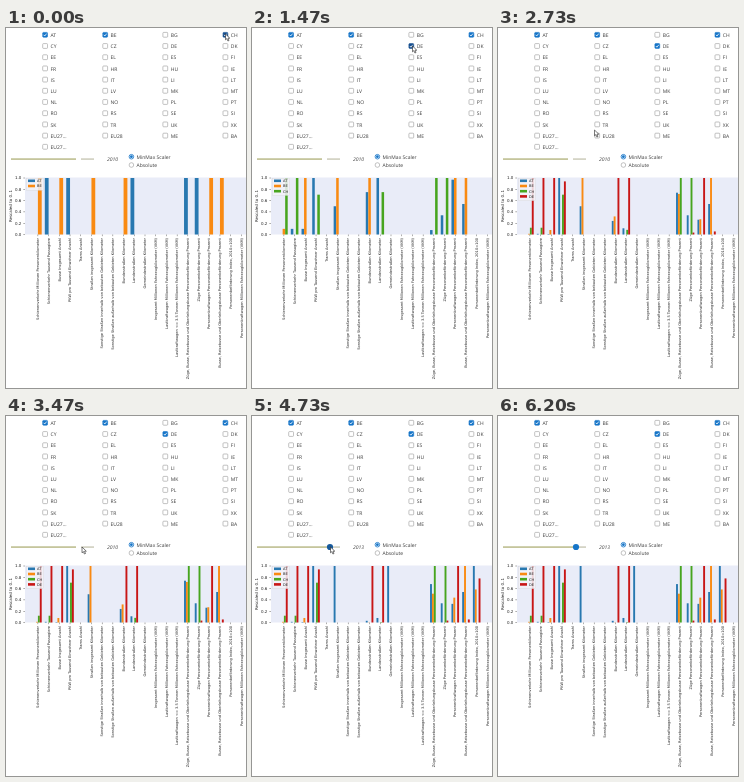
An HTML page that plays this animation: 240x360 px, repeating every 6270 ms.

```html
<!DOCTYPE html>
<html lang="de">
<head>
<meta charset="utf-8">
<title>Ländervergleich</title>
<style>
html, body { margin: 0; width: 100%; height: 100%; overflow: hidden; background: #fff; }
svg { display: block; width: 240px; height: 360px; }
text { font: 5px "Open Sans", sans-serif; fill: #3a3a3a; text-rendering: geometricPrecision; }
.plot text { font: 4px "DejaVu Sans", sans-serif; fill: #222; }
.plot .cat, .plot .key { font-size: 3.58px; }
.year { font-style: italic; fill: #444; }
</style>
</head>
<body>
<svg viewBox="0 0 240 360">
  <g id="form"></g>
  <g id="slider"></g>
  <g class="plot">
    <rect x="19" y="149.5" width="221" height="57" fill="#e9ecf8"/>
    <g id="axes"></g>
    <g id="bars"></g>
  </g>
  <g id="pointer"></g>
</svg>
<script>
const LOOP = 6270, DE_CHECKED = 1400, YEAR_MOVED = 3600, RELEASED = 5700;
const $ = id => document.getElementById(id);
const text = (x, y, s, attrs = '') => `<text x="${x}" y="${y}" ${attrs}>${s}</text>`;
const rect = (x, y, w, h, fill, attrs = '') =>
  `<rect x="${x}" y="${y}" width="${w}" height="${h}" fill="${fill}" ${attrs}/>`;
const circle = (x, y, r, fill, attrs = '') => `<circle cx="${x}" cy="${y}" r="${r}" fill="${fill}" ${attrs}/>`;

const countries = [
  'AT CY EE FR IS LU NL RO SK EU27... EU27...',
  'BE CZ EL HR IT LV NO RS TR EU28',
  'BG DE ES HU LI MK PL SE UK ME',
  'CH DK FI IE LT MT PT SI XK BA'
].map(col => col.split(' '));

const names = ['AT', 'BE', 'CH', 'DE'];
const colors = ['#2878b0', '#f98a12', '#47a51f', '#c81616'];

const vkm = 'Millionen Fahrzeugkilometer (VKM)';
const share = 'Personenbeförderung Prozent';
const coaches = 'Reisebusse und Oberleitungsbusse';

// Name, then for 2010 and 2013: countries (A = AT, B = BE, C = CH, D = DE) from lowest to
// highest and the level of the second highest. A sign tells how close the third comes to it.
const closeness = { '<': .1, '~': .75, '≈': .97 };
const categories = [
  ['Schienenverkehr Millionen Personenkilometer', 'AB<CD', .12],
  ['Schienenverkehr Tausend Passagiere', 'BA<CD', .12],
  ['Busse Insgesamt Anzahl', 'CA<BD', .08],
  ['PKW pro Tausend Einwohner Anzahl', 'BC~DA', .94],
  ['Trams Anzahl'],
  ['Straßen insgesamt Kilometer', 'CAB', .5, 'CA'],
  ['Sonstige Straßen innerhalb von bebauten Gebieten Kilometer'],
  ['Sonstige Straßen außerhalb von bebauten Gebieten Kilometer'],
  ['Bundesstraßen Kilometer', 'CA~BD', .32, 'CB<AD', .03],
  ['Landesstraßen Kilometer', 'BC~AD', .11, 'BC<AD', .08],
  ['Gemeindestraßen Kilometer', '', 0, 'CA'],
  ['Insgesamt ' + vkm],
  ['Lastkraftwagen ' + vkm],
  ['Lastkraftwagen &lt;= 3.5 Tonnen ' + vkm],
  [`Züge, Busse, ${coaches} ${share}`, 'DB≈AC', .74, 'DB~AC', .68],
  ['Züge ' + share, 'BD<AC', .34],
  ['Personenkraftwagen ' + share, 'CA≈BD', .27, 'CA~BD', .44],
  [`Busse, ${coaches} ${share}`, 'CD<AB', .54],
  ['Personenbeförderung Index, 2010=100', '', 0, 'CB~DA', .78],
  ['Personenkraftwagen ' + vkm]
];

// Min-max scaling over the first n countries.
function scaled([, spec = '', top, newSpec = spec, newTop = top], n, newYear) {
  const s = newYear ? newSpec : spec, high = newYear ? newTop : top;
  const order = s.replace(/\W/g, '').split('');
  const inner = order.length > 3 ? [high * closeness[s[2]], high] : [high];
  const raw = order.map((c, i) => i === 0 ? 0 : i === order.length - 1 ? 1 : inner[i - 1]);
  const shown = order.map((c, i) => ({ k: 'ABCD'.indexOf(c), v: raw[i] })).filter(e => e.k < n);
  const values = shown.map(e => e.v), min = Math.min(...values), max = Math.max(...values);
  const base = shown.length > 1 ? min : 0;
  return shown.map(e => ({ k: e.k, v: (e.v - base) / (max - base || 1) }));
}

const center = i => 31.9 + 10.71 * i;
const level = v => 206.5 - 56.5 * v;

function drawForm(t) {
  const on = new Set(t < DE_CHECKED ? names.slice(0, 3) : names);
  const hot = t < 330 ? 'CH' : t >= DE_CHECKED && t < 2200 ? 'DE' : '';
  let out = '';
  countries.forEach((col, c) => col.forEach((name, r) => {
    const x = 39.1 + 60.1 * c, y = 6.8 + 11.2 * r, checked = on.has(name);
    const fill = name === hot ? '#174f8f' : checked ? '#1675c8' : '#fff';
    out += rect(x - 2.4, y - 2.4, 4.8, 4.8, fill, `rx=".8" stroke="${checked ? fill : '#999'}" stroke-width=".6"`);
    if (checked) out += `<path d="M${x - 1.4} ${y}l1 1.2 1.9-2.4" fill="none" stroke="#fff" stroke-width=".8"/>`;
    out += text(x + 5.4, y + 2.2, name);
  }));
  out += circle(125.4, 128.7, 2.3, '#fff', 'stroke="#1675c8" stroke-width=".8"') + circle(125.4, 128.7, 1.4, '#1675c8');
  out += circle(125.4, 137, 2.3, '#fff', 'stroke="#999" stroke-width=".6"');
  out += text(130.5, 130.6, 'MinMax Scaler') + text(130.5, 139, 'Absolute');
  $('form').innerHTML = out;
}

function drawSlider(t) {
  const moved = t >= YEAR_MOVED;
  const [left, right] = moved ? [78, 78] : [70, 75];
  let out = rect(5, 130.6, left - 5, .9, '#8b8c3a') + rect(right, 130.6, 88 - right, .9, '#aaa98c');
  if (moved) out += circle(78, 131, 3.1, t < RELEASED ? '#175a9c' : '#1675c8');
  out += text(101, 133.2, moved ? '2013' : '2010', 'class="year"');
  $('slider').innerHTML = out;
}

function drawBars(t) {
  const n = t < 400 ? 2 : t < 1730 ? 3 : 4, w = 7.6 / n;
  let out = '';
  categories.forEach((cat, i) => {
    for (const { k, v } of scaled(cat, n, t >= 4730))
      out += rect(center(i) - 3.8 + k * w, level(v), w, 56.5 * v, colors[k]);
  });
  out += rect(20.3, 150.3, 17.5, 1.6 + 5.2 * n, '#f3f3f8', 'fill-opacity=".85" stroke="#ccc" stroke-width=".3"');
  for (let k = 0; k < n; k++)
    out += rect(22, 151.5 + 5.2 * k, 7, 2.6, colors[k]) + text(31, 154.1 + 5.2 * k, names[k], 'class="key"');
  $('bars').innerHTML = out;
}

function drawAxes() {
  let out = text(0, 0, 'Rescaled to 0..1', 'transform="translate(6 178) rotate(-90)" text-anchor="middle"');
  for (let k = 0; k <= 5; k++) {
    const y = level(k / 5);
    out += text(15.3, y + 1.4, (k / 5).toFixed(1), 'text-anchor="end"') + rect(17.3, y - .2, 1.7, .4, '#333');
  }
  categories.forEach(([name], i) => {
    out += rect(center(i) - .2, 206.5, .4, 1.7, '#333');
    out += text(0, 0, name, `class="cat" transform="translate(${center(i) + 1.2} 210) rotate(-90)" text-anchor="end"`);
  });
  $('axes').innerHTML = out;
}

// Pointer stops: time of arrival, x, y.
const stops = [[0, 219, 6], [870, 160, 18], [2700, 96, 102], [3270, 73, 131], [3670, 78, 131]];
const TRAVEL = 400;

function drawPointer(t) {
  let [, x, y] = stops[0];
  for (const [arrival, toX, toY] of stops.slice(1)) {
    const p = Math.min(1, Math.max(0, 1 + (t - arrival) / TRAVEL)), e = p * p * (3 - 2 * p);
    x += (toX - x) * e;
    y += (toY - y) * e;
  }
  $('pointer').innerHTML = t > RELEASED ? '' : `<path transform="translate(${x} ${y})"
    d="M.5 0V5.8L1.9 4.6 2.9 7 4 6.5 3 4.2H4.8Z" fill="#fff" stroke="#222" stroke-width=".6"/>`;
}

function frame() {
  const t = performance.now() % LOOP;
  drawForm(t);
  drawSlider(t);
  drawBars(t);
  drawPointer(t);
  requestAnimationFrame(frame);
}
drawAxes();
frame();
</script>
</body>
</html>
```
